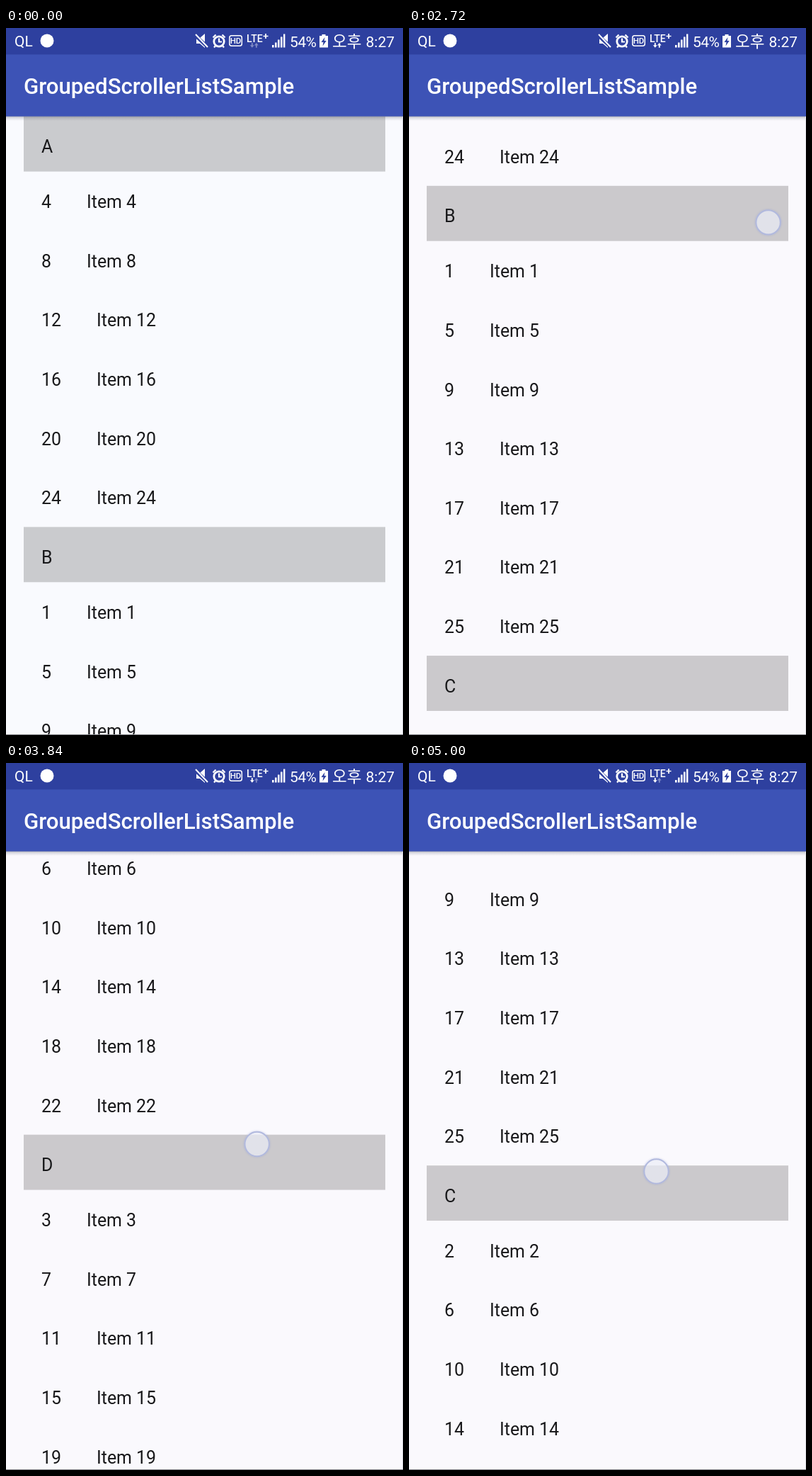
An HTML page that plays this animation: 561x998 px, repeating every 5.04 s.

```html
<!DOCTYPE html>
<html lang="ko">
<head>
<meta charset="utf-8">
<title>Sectioned list</title>
<style>
  html, body { margin: 0; width: 100%; height: 100%; overflow: hidden; }
  svg {
    display: block; width: 561px; height: 998px;
    --page: #f9fafe; --head: #cacbce;
    font-family: Roboto, "Noto Sans CJK KR", "Noto Sans CJK", sans-serif;
  }
  svg.moving { --page: #faf9fd; --head: #cbc9cc; }
  .page { fill: var(--page); }
  .head { fill: var(--head); }
  #list text { font-size: 24.9px; fill: #18181a; }
  .title { font-size: 31.2px; font-weight: 500; fill: #fff; }
  .status { fill: #fff; font-size: 21px; }
</style>
</head>
<body>
<svg id="stage" viewBox="0 0 561 998">
  <defs>
    <linearGradient id="shade" x1="0" y1="0" x2="0" y2="1">
      <stop offset="0" stop-color="#444a60" stop-opacity=".5"/>
      <stop offset=".4" stop-color="#444a60" stop-opacity=".17"/>
      <stop offset="1" stop-color="#444a60" stop-opacity="0"/>
    </linearGradient>
    <radialGradient id="halo">
      <stop offset=".78" stop-color="#8d99cf" stop-opacity=".3"/>
      <stop offset="1" stop-color="#8d99cf" stop-opacity="0"/>
    </radialGradient>
  </defs>

  <rect class="page" width="561" height="998"/>
  <g id="list"></g>
  <path id="glow" d="M50 998Q280 974 511 998Z" fill="#3f51b5" opacity="0"/>

  <rect y="124" width="561" height="7" fill="url(#shade)"/>
  <rect width="561" height="124.7" fill="#3d53b6"/>
  <rect width="561" height="37.4" fill="#2e409f"/>
  <text class="title" x="25" y="93">GroupedScrollerListSample</text>

  <g class="status">
    <text x="12" y="26">QL</text>
    <circle cx="58" cy="18" r="9.5"/>

    <!-- muted speaker -->
    <path d="M269 14h5l7-6v20l-7-6h-5z"/>
    <path d="M267 10l18 17" stroke="#2e409f" stroke-width="5"/>
    <path d="M268 9l17 18" stroke="#fff" stroke-width="2"/>

    <!-- alarm clock -->
    <circle cx="301" cy="19" r="7.2" fill="none" stroke="#fff" stroke-width="2.8"/>
    <path d="M301 14.5v5h4M292.5 13.5l4-4M309.5 13.5l-4-4M296 25l-2 2.5M306 25l2 2.5"
      fill="none" stroke="#fff" stroke-width="2.2"/>

    <rect x="315.8" y="10.8" width="17.5" height="14.5" rx="3" fill="none" stroke="#fff" stroke-width="1.5"/>
    <text x="324.5" y="22.2" font-size="11.5" font-weight="500" text-anchor="middle">HD</text>

    <text x="340" y="19.5" font-size="14" font-weight="500">LTE</text>
    <path d="M363.5 11.5h7M367 8v7" stroke="#fff" stroke-width="1.7"/>
    <path id="down" d="M346.9 21h1.8v3.2h2l-2.9 3.6-2.9-3.6h2z"/>
    <path id="up" d="M352.9 27.8h1.8v-3.2h2l-2.9-3.6-2.9 3.6h2z"/>

    <path d="M376 24h2.6v3.5H376zM380 20.5h2.6v7H380zM384 16.5h2.6v11H384zM388 12.5h2.6v15H388zM392 8.5h2.4v19H392z"/>

    <text x="401" y="26.5" letter-spacing="-.6">54%</text>
    <path d="M446.5 9h5v2h3.5v16.5h-12V11h3.5z"/>
    <path d="M450.5 13l-5 7h3l-1 5.5 5.2-7.5h-3.1z" fill="#2e409f"/>
    <text x="461" y="26.5" font-size="22.5">오후</text>
    <text x="508.5" y="26.5">8:27</text>
  </g>

  <g id="touch" visibility="hidden">
    <circle r="21" fill="url(#halo)"/>
    <circle r="17.2" fill="#fff" fill-opacity=".58" stroke="#b1b9de" stroke-width="2"/>
  </g>
  <path d="M560.5 125v873" stroke="#dfe0e7"/>
  <path d="M0 997.5h561" stroke="#85868b"/>
</svg>

<script>
(() => {
  const LOOP = 5040, STEP = 40;
  const HEAD = 77.9, ROW = 83.63;
  const $ = id => document.getElementById(id);
  const list = $('list');

  function add(tag, attrs, text = '') {
    const el = document.createElementNS('http://www.w3.org/2000/svg', tag);
    for (const key in attrs) el.setAttribute(key, attrs[key]);
    el.textContent = text;
    list.append(el);
  }

  // Each section holds every fourth number.
  let rowY = 124.7;
  [['A', 4], ['B', 1], ['C', 2], ['D', 3]].forEach(([name, first]) => {
    add('rect', { class: 'head', x: 25, y: rowY, width: 511, height: HEAD });
    add('text', { x: 50, y: rowY + 51.6 }, name);
    rowY += HEAD;
    for (let n = first; n <= 25; n += 4) {
      add('text', { x: 50, y: rowY + 51.6 }, n);
      add('text', { x: n > 9 ? 128 : 114, y: rowY + 51.6 }, `Item ${n}`);
      rowY += ROW;
    }
  });

  // Finger drags; "offset" is the list's scroll when the finger lands.
  const drags = [
    { start: 2160, end: 2760, from: [530, 756], to: [506, 240], offset: 0, power: 1 },
    { start: 3160, end: 3480, from: [413, 465], to: [402, 364], offset: 985.6, power: 1 },
    { start: 3680, end: 3920, from: [358, 650], to: [353, 482], offset: 1310.7, power: 1 },
    { start: 4320, end: 4680, from: [338, 395], to: [326, 802], offset: 1529, power: 2 },
    { start: 4800, end: 5000, from: [350, 547], to: [349.5, 576.5], offset: 829, power: 1 }
  ];

  const mix = (a, b, p) => a + (b - a) * p;
  const part = (t, a, b) => Math.min(1, Math.max(0, (t - a) / (b - a)));

  function finger(drag, t) {
    const p = part(t, drag.start, drag.end) ** drag.power;
    return drag.from.map((v, i) => mix(v, drag.to[i], p));
  }

  // The list follows the finger, then coasts until the next touch.
  function scrollAt(t) {
    const i = drags.findLastIndex(d => t >= d.start);
    if (i < 0) return 0;
    const drag = drags[i], next = drags[i + 1];
    const dragged = drag.offset + drag.from[1] - finger(drag, t)[1];
    if (t <= drag.end || !next) return dragged;
    const p = part(t, drag.end, next.start);
    return mix(dragged, next.offset, 1 - (1 - p) ** 1.4);
  }

  function draw(t) {
    $('stage').classList.toggle('moving', t >= drags[0].start);
    list.setAttribute('transform', `translate(0 ${-scrollAt(t)})`);
    $('glow').setAttribute('opacity', t < 4280 ? 0 : .09 * (1 - part(t, 4280, 4800)));
    $('down').setAttribute('opacity', t >= 2040 ? 1 : .4);
    $('up').setAttribute('opacity', t >= 2040 && t < 3800 ? 1 : .4);

    const drag = drags.find(d => t >= d.start && t <= d.end);
    $('touch').setAttribute('visibility', drag ? 'visible' : 'hidden');
    if (drag) $('touch').setAttribute('transform', `translate(${finger(drag, t)})`);
  }

  const begin = performance.now();
  function tick() {
    const t = (performance.now() - begin) % LOOP;
    draw(Math.floor(t / STEP) * STEP);
    requestAnimationFrame(tick);
  }
  tick();
})();
</script>
</body>
</html>
```
